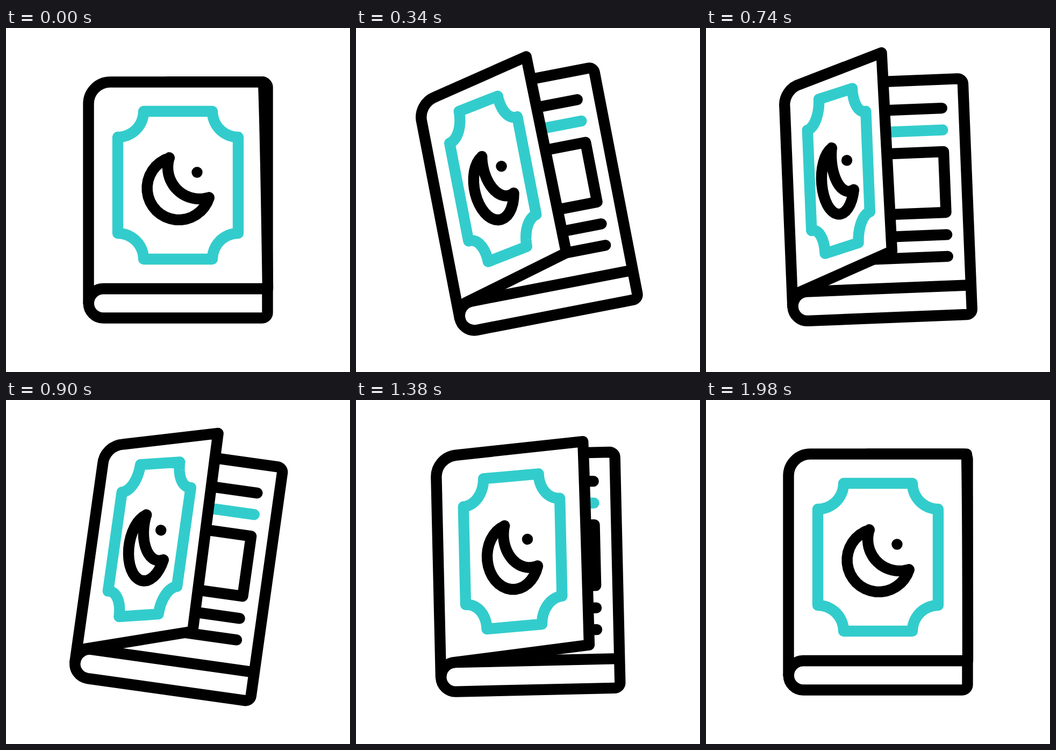
Animation of 640 by 640 pixels, one loop 2400 ms. Source, as an HTML page:

```html
<!DOCTYPE html>
<html lang="en">
<head>
<meta charset="utf-8">
<title>Opening book</title>
<style>
  html, body { margin: 0; height: 100%; overflow: hidden; background: #fff; }
  svg { display: block; width: 100vw; height: 100vh; }
  path { fill: none; stroke: #000; stroke-width: 20.4; stroke-linecap: round; stroke-linejoin: round; }
  .teal { stroke: #33cccc; }
  #cover { fill: #fff; }
</style>
</head>
<body>
<svg viewBox="0 0 640 640">
  <g id="book">
    <path d="M300 154H445.5M290 235H445.5V348H290M290 389.5H445.5M290 430H445.5"/>
    <path class="teal" d="M300 194.5H445.5"/>
    <path d="M300 100.5H476.5a10 10 0 0 1 10 10V529.5a10 10 0 0 1-10 10H181a27.25 27.25 0 0 1 0-54.5H486.5"/>
    <path id="cover"/>
    <path id="frame" class="teal"/>
    <path id="moon"/>
    <circle id="dot" r="10.2"/>
  </g>
</svg>
<script>
const LOOP = 2400;
const CX = 320, CY = 292.5; // centre of the cover's ornament
const $ = id => document.getElementById(id);
const mix = (a, b, p) => a + (b - a) * p;

// Keys are [ms, value]; each swing is half the one before, to the other side.
const swings = [545, 903, 1237, 1547].map((t, i) => [t, -16 * (-.5) ** i]);
const tilt = [[0, 0], ...swings, [1790, 0], [LOOP, 0]];
const opening = [[0, 0], [505, 1.06], [740, 1], [1060, .7], [1620, .18], [1990, 0], [LOOP, 0]];

// Cubic interpolation, flat at turning points and ends.
function slope(keys, i) {
  const a = keys[i - 1], b = keys[i], c = keys[i + 1];
  if (!a || !c || (b[1] - a[1]) * (c[1] - b[1]) <= 0) return 0;
  return (c[1] - a[1]) / (c[0] - a[0]);
}
function track(keys, t) {
  const i = keys.findIndex(k => k[0] > t) - 1;
  const [t0, v0] = keys[i], [t1, v1] = keys[i + 1];
  const d = t1 - t0, u = (t - t0) / d, w = 1 - u;
  return v0 * w * w * (1 + 2 * u) + v1 * u * u * (3 - 2 * u) +
    d * u * w * (slope(keys, i) * w - slope(keys, i + 1) * u);
}

// Points on a circle around an offset from the centre, angles in degrees.
function arc(x, y, r, from, to, steps = 24) {
  return Array.from({ length: steps + 1 }, (_, i) => {
    const a = mix(from, to, i / steps) * Math.PI / 180;
    return [x + r * Math.cos(a), y + r * Math.sin(a)];
  });
}

const frame = [[1, -1], [1, 1], [-1, 1], [-1, -1]].flatMap(([sx, sy], i) =>
  arc(112 * sx, 137.5 * sy, 48, 180 + 90 * i, 90 + 90 * i));
const moon = [...arc(1.5, 5.5, 59, 252.6, 17.5), ...arc(40, -33.5, 59, 72.5, 197.5)];

// How far a point moves when the cover is open.
const frameShift = (x, y) => [-71 - .51 * x, -29.4 - .137 * x + .045 * y];
const moonShift = (x, y) => [-74 - .487 * x, -18 + .07 * y];

function drawShape(id, points, shift, p) {
  const moved = points.map(([x, y]) => {
    const [dx, dy] = shift(x, y);
    return [CX + x + dx * p, CY + y + dy * p];
  });
  $(id).setAttribute('d', `M${moved.join('L')}Z`);
}

// The free top corner starts slightly pulled in by `tuck`.
function drawCover(p, tuck) {
  const top = [mix(485, 337.4, p) - tuck, mix(100.5, 46.5, p)];
  const edge = [mix(487, 338.5, p) - tuck * .7, mix(200, 140, p)];
  const bottom = [mix(487, 342, p), mix(485, 416, p)];
  $('cover').setAttribute('d',
    `M153.5 512V141A40.5 40.5 0 0 1 ${194 - 9 * p} ${100.5 - 2 * p}` +
    `L${top}Q${edge} ${bottom}L${181 - 15 * p} ${485 + p}A27.25 27.25 0 0 0 153.5 512Z`);
}

const start = performance.now();
function draw(now) {
  const t = Math.max(0, now - start) % LOOP;
  const p = track(opening, t);
  $('book').setAttribute('transform', `rotate(${track(tilt, t)} 320 320)`);
  drawCover(p, 6 * Math.max(0, 1 - t / 300));
  drawShape('frame', frame, frameShift, p);
  drawShape('moon', moon, moonShift, p);
  $('dot').setAttribute('cx', mix(355.5, 265, p));
  $('dot').setAttribute('cy', mix(268.5, 244, p));
  requestAnimationFrame(draw);
}
draw(start);
</script>
</body>
</html>
```
